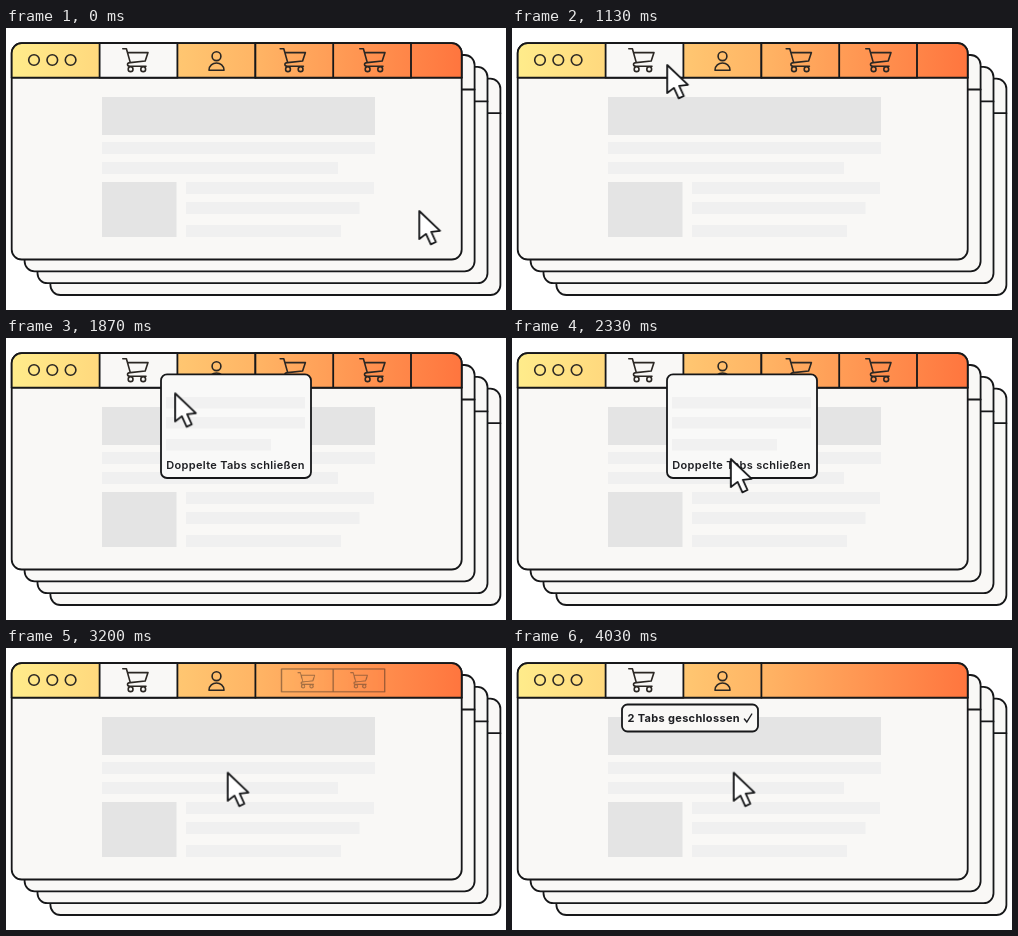
Animation, 500 px wide and 282 px high, one loop 5.3 s. Source, as an HTML page:

```html
<!DOCTYPE html>
<html lang="de">
<head>
<meta charset="utf-8">
<title>Doppelte Tabs schließen</title>
<style>
  html, body { margin: 0; width: 100%; height: 100%; overflow: hidden; background: #fff; }
  svg { display: block; width: 100vw; height: 100vh; }
  .ink { stroke: #161719; stroke-width: 1.8; stroke-linejoin: round; stroke-linecap: round; }
  .icon { fill: none; stroke: #2b2723; stroke-width: 1.6; stroke-linejoin: round; stroke-linecap: round; }
  text { font: 600 11px Inter, "Open Sans", sans-serif; letter-spacing: .32px; fill: #1d1e22; }
  .toast text { font-weight: 700; }

  .cursor, .menu, .pair, .toast { animation: 5300ms linear infinite; }
  .cursor { animation-name: move; }
  .menu { transform-origin: 214px 88px; animation-name: menu-size, menu-fade; }
  .pair { transform-origin: 327px 32.4px; animation-name: pair-size, pair-fade; }
  .toast { transform-origin: 178px 70px; animation-name: toast-size, toast-fade; }

  @keyframes move {
    0% { transform: translate(413.3px, 183px); animation-timing-function: cubic-bezier(.65, 0, .35, 1); }
    20.755% { transform: translate(155.2px, 37px); }
    27.566% { transform: translate(155.2px, 37px); animation-timing-function: cubic-bezier(.65, 0, .35, 1); }
    48.15%, 100% { transform: translate(221.7px, 124.7px); }
  }

  @keyframes menu-size {
    0% { transform: scale(0); }
    21.38% { transform: scale(0); animation-timing-function: cubic-bezier(.333, 1.267, .667, 1); }
    28.92%, 51.887% { transform: scale(1); }
    57.547%, 100% { transform: scale(0); }
  }
  @keyframes menu-fade {
    0%, 21.38% { opacity: 0; }
    25%, 51.887% { opacity: 1; animation-timing-function: cubic-bezier(.333, .667, .667, 1); }
    57.547%, 100% { opacity: 0; }
  }

  @keyframes pair-size {
    0%, 58.49% { transform: scale(1); }
    64.15%, 100% { transform: scale(0); }
  }
  @keyframes pair-fade {
    0%, 58.49% { opacity: 1; animation-timing-function: cubic-bezier(.333, .667, .667, 1); }
    64.15%, 100% { opacity: 0; }
  }

  @keyframes toast-size {
    0% { transform: scale(0); }
    67.92% { transform: scale(0); animation-timing-function: cubic-bezier(.333, 1.267, .667, 1); }
    76.04%, 100% { transform: scale(1); }
  }
  @keyframes toast-fade {
    0%, 67.92% { opacity: 0; }
    72%, 100% { opacity: 1; }
  }
</style>
</head>
<body>
<svg viewBox="0 0 500 282" preserveAspectRatio="none">
  <defs>
    <linearGradient id="bar" gradientUnits="userSpaceOnUse" x1="6" y1="0" x2="456" y2="0">
      <stop offset="0" stop-color="#ffec8b"/>
      <stop offset=".54" stop-color="#ffb565"/>
      <stop offset="1" stop-color="#ff753e"/>
    </linearGradient>
    <g id="window" class="ink" fill="#f9f8f6">
      <rect x="5.7" y="15.2" width="450" height="216.3" rx="10"/>
      <path d="M5.7 49.7H455.7"/>
    </g>
    <g id="cart" class="icon">
      <path d="M116.8 20.8H120.4L124.3 34.6L139.2 33L142 24.6H121.5M124.3 34.6C120.6 34.8 120.6 38.3 124 38.3H140"/>
      <circle cx="124.6" cy="41.2" r="2.4"/>
      <circle cx="137.2" cy="41.2" r="2.4"/>
    </g>
  </defs>

  <use href="#window" x="38.7" y="35.5"/>
  <use href="#window" x="25.8" y="23.7"/>
  <use href="#window" x="12.9" y="11.8"/>
  <use href="#window"/>

  <path class="ink" fill="url(#bar)" d="M5.7 49.7V25.2A10 10 0 0 1 15.7 15.2H445.7A10 10 0 0 1 455.7 25.2V49.7Z"/>
  <path class="ink" fill="#f9f8f6" d="M93.6 15.2H171.4V49.7H93.6Z"/>
  <path class="ink" d="M249.4 15.2V49.7"/>
  <g class="icon">
    <circle cx="28" cy="32" r="5.3"/>
    <circle cx="46.3" cy="32" r="5.3"/>
    <circle cx="64.6" cy="32" r="5.3"/>
    <circle cx="210.5" cy="28.2" r="4.4"/>
    <path d="M203 42.2C203 32.6 218 32.6 218 42.2Z"/>
  </g>
  <use href="#cart"/>

  <g fill="#f0f0f0">
    <path fill="#e4e4e4" d="M96 69H369V107H96ZM96 154H170.5V209H96Z"/>
    <path d="M96 114H369V126H96ZM96 134H332V146H96ZM180 154H368V166H180ZM180 174H353.5V186H180ZM180 197H335V209H180Z"/>
  </g>

  <g class="pair">
    <path class="ink" fill="url(#bar)" d="M249.4 15.2H405V49.7H249.4ZM327.2 15.2V49.7"/>
    <use href="#cart" x="157.4"/>
    <use href="#cart" x="237"/>
  </g>

  <g class="menu">
    <rect class="ink" fill="#f9f9f8" x="155" y="36.4" width="150" height="103.6" rx="6"/>
    <path fill="#f1f1f1" d="M160 59H299V70.5H160ZM160 79H299V90.5H160ZM160 101H265V112.5H160Z"/>
    <text x="160.3" y="131">Doppelte Tabs schließen</text>
  </g>

  <g class="toast">
    <rect class="ink" fill="#f9f8f6" x="110" y="56.5" width="136" height="27" rx="5.5"/>
    <text x="115.6" y="74">2 Tabs geschlossen</text>
    <path d="M232.4 71L234.8 74L239.8 66" fill="none" stroke="#1d1e22" stroke-width="1.4" stroke-linecap="round"/>
  </g>

  <path class="ink cursor" fill="#fff" d="M0 0V28L6.7 22.9L11.5 33.4L16.6 31L12 20.8L20.8 19.8Z"/>
</svg>
</body>
</html>
```
